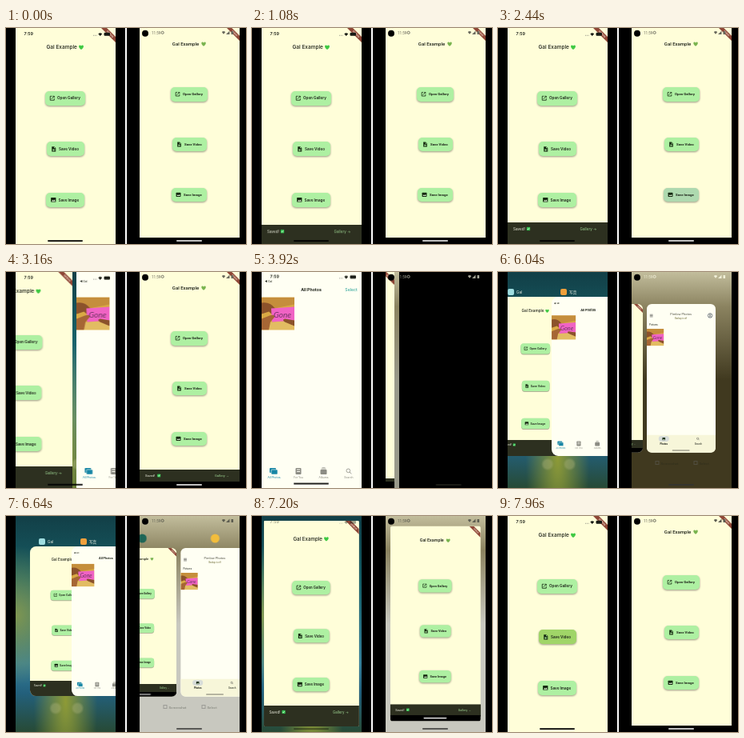
Animation of 300 by 270 pixels, one loop 8 s. Source, as an HTML page:

```html
<!DOCTYPE html>
<html lang="en">
<head>
<meta charset="utf-8">
<title>Gal Example</title>
<style>
html, body { margin: 0; width: 100%; height: 100%; overflow: hidden; background: #000; }
.divider { position: absolute; left: 149px; top: 0; width: 2px; height: 270px; background: #fff; }
.phone { position: absolute; top: 0; width: 125px; height: 270px; overflow: hidden; }
.ios { left: 12px; font-family: Inter, sans-serif; }
.android { left: 167px; font-family: Roboto, sans-serif; }
.wall, .slot, .card, .phone svg.full { position: absolute; left: 0; top: 0; width: 125px; height: 270px; }
.card { overflow: hidden; transform-origin: 0 0; }
svg { display: block; overflow: visible; }
.gal { background: #fffed9; }
.photos { background: #fffff3; }
text { fill: #1c2018; }
.mid { text-anchor: middle; }
.ios .title { font-size: 6.5px; font-weight: 500; }
.android .title { font-size: 6px; font-weight: 500; }
.btn text { font-weight: 600; }
.ios .btn text { font-size: 4.6px; }
.android .btn text { font-size: 4.35px; }
.btn rect { fill: #aef0a2; filter: drop-shadow(0 1px 1px #0006); }
.snack rect { fill: #2d3020; }
.snack text { font-size: 4.6px; fill: #eef0e0; }
.snack .action { fill: #9fd693; }
.android .snack text { font-size: 4.2px; }
.tab { font-size: 3.4px; text-anchor: middle; fill: #8c8c84; }
.tag { position: absolute; }

/* Every part shares one eight second clock */
.wall, .slot, .card, .status, .tag, .snack, .splash, .press { animation: 8s linear infinite; }

.ios .wall {
  background:
    radial-gradient(circle at 40% 89%, #a9b0786b 0 5px, transparent 8px),
    radial-gradient(circle at 62% 89%, #a9b0786b 0 5px, transparent 8px),
    radial-gradient(ellipse at 50% 86%, #8e9a36 0, transparent 45%),
    radial-gradient(ellipse at 0 46%, #7f9650 0, transparent 42%),
    linear-gradient(#123f47, #176068 30%, #37809a 68%, #23607c 82%, #274a35);
}
.android .wall { background: #99998a; animation-name: dim; }
@keyframes dim {
  0%, 67% { background-color: #99998a; }
  75.5%, 78% { background-color: #40391f; }
  83%, 100% { background-color: #c8c8bf; }
}
.glow { position: absolute; inset: 0; background: linear-gradient(#c2bd9c, #8b8360 16%, #5d563600 50%); }

.ios .card { animation-name: ios-scale; }
@keyframes ios-scale {
  0%, 67.5% { transform: scale(1); border-radius: 0; animation-timing-function: ease-out; }
  75.5% { transform: scale(.737); border-radius: 11px; animation-timing-function: ease-out; }
  83%, 87% { transform: scale(.693); border-radius: 11px; animation-timing-function: ease-out; }
  91.5%, 100% { transform: scale(1); border-radius: 0; }
}
.ios .home { animation-name: ios-gal; }
@keyframes ios-gal {
  0%, 38% { transform: none; animation-timing-function: ease-out; }
  43.5%, 67.5% { transform: translate(-130px, 0); animation-timing-function: ease-out; }
  75.5% { transform: translate(-11px, 31px); animation-timing-function: ease-out; }
  83%, 87% { transform: translate(18px, 38px); animation-timing-function: ease-out; }
  91.5%, 100% { transform: none; }
}
.ios .library { animation-name: ios-photos; }
@keyframes ios-photos {
  0%, 38% { transform: translate(130px, 0); animation-timing-function: ease-out; }
  43.5%, 67.5% { transform: none; animation-timing-function: ease-out; }
  75.5% { transform: translate(55px, 31px); animation-timing-function: ease-out; }
  83%, 87% { transform: translate(70px, 38px); animation-timing-function: ease-out; }
  91.5%, 100% { transform: translate(140px, 0); }
}
.ios .tag { left: 11px; top: -10px; animation-name: ios-tag; }
@keyframes ios-tag { 0%, 71% { opacity: 0; } 75%, 87% { opacity: 1; } 89%, 100% { opacity: 0; } }
.ios .status { animation-name: ios-status; }
@keyframes ios-status {
  0%, 39% { opacity: 1; transform: none; }
  42%, 67.5% { opacity: 1; transform: translateY(-1.5px); }
  70%, 89% { opacity: 0; transform: none; }
  91.5%, 100% { opacity: 1; transform: none; }
}
.ios .snack { animation-name: ios-snack; }
@keyframes ios-snack {
  0%, 11% { transform: translateY(28px); animation-timing-function: ease-out; }
  14.5%, 92% { transform: none; animation-timing-function: ease-in; }
  95%, 100% { transform: translateY(28px); }
}

.android .card { animation-name: android-scale; }
@keyframes android-scale {
  0%, 67.5% { transform: scale(1); border-radius: 0; animation-timing-function: ease-out; }
  74.5%, 88% { transform: scale(.688); border-radius: 9px; animation-timing-function: ease-out; }
  92%, 100% { transform: scale(1); border-radius: 0; }
}
.android .home { animation-name: android-gal; }
@keyframes android-gal {
  0%, 46.5% { transform: none; }
  49% { transform: translate(-114px, 0); }
  49.75%, 67.5% { transform: translate(-130px, 0); animation-timing-function: ease-out; }
  74.5%, 79% { transform: translate(-72px, 40px); }
  83% { transform: translate(-40px, 40px); animation-timing-function: ease-out; }
  86.5%, 88% { transform: translate(19px, 40px); animation-timing-function: ease-out; }
  92%, 100% { transform: none; }
}
.android .library { animation-name: android-photos; }
@keyframes android-photos {
  0%, 46.5% { transform: translate(130px, 0); }
  49% { transform: translate(17px, 0); }
  49.75%, 67.5% { transform: none; animation-timing-function: ease-out; }
  74.5%, 79% { transform: translate(19px, 40px); }
  83% { transform: translate(51px, 40px); animation-timing-function: ease-out; }
  86.5%, 88% { transform: translate(110px, 40px); }
  92%, 100% { transform: translate(150px, 40px); }
}
.android .tag { left: 37px; top: -18px; animation-name: android-tag; }
@keyframes android-tag { 0%, 76% { opacity: 0; } 80%, 88% { opacity: 1; } 90%, 100% { opacity: 0; } }
.android .status { animation-name: android-status; }
@keyframes android-status {
  0%, 47% { color: #68685c; }
  48.5%, 52% { color: #a5a596; }
  54%, 69% { color: #68685c; }
  74%, 78% { color: #f0efd8; }
  82%, 100% { color: #5c5c50; }
}
.android .snack { animation-name: android-snack; }
@keyframes android-snack {
  0%, 32.5% { transform: translateY(16px); animation-timing-function: ease-out; }
  35.5%, 46.5% { transform: none; }
  49% { transform: translateY(11px); }
  50% { transform: translateY(15px); }
  54%, 93% { transform: none; animation-timing-function: ease-in; }
  96%, 100% { transform: translateY(16px); }
}
.splash { animation-name: splash; }
@keyframes splash { 0%, 52% { opacity: 1; } 54.5%, 100% { opacity: 0; } }

.press.save-ios { animation-name: press-ios; }
@keyframes press-ios { 0%, 5.5% { fill: #aef0a2; } 7%, 9.5% { fill: #a0d86a; } 12%, 100% { fill: #aef0a2; } }
.press.video-ios { animation-name: press-video; }
@keyframes press-video { 0%, 97.5% { fill: #aef0a2; } 99.3%, 100% { fill: #a0d568; } }
.press.save-android { animation-name: press-android; }
@keyframes press-android { 0%, 29% { fill: #aef0a2; } 30.4%, 32% { fill: #aed9af; } 34%, 100% { fill: #aef0a2; } }
</style>
</head>
<body>
<svg width="0" height="0" style="position:absolute">
  <symbol id="open" viewBox="0 0 24 24"><path d="M11 4H4v16h16v-7M14 4h6v6M20 4 9 15" fill="none" stroke="#14280f" stroke-width="2.6"/></symbol>
  <symbol id="file" viewBox="0 0 24 24"><path d="M4 2h10l6 6v14H4z" fill="#14280f"/><path d="M13 3v6h6M8 13h5v6H8zM13 16l4-3v6z" fill="#aef0a2"/></symbol>
  <symbol id="image" viewBox="0 0 24 24"><rect x="2" y="3" width="20" height="18" rx="2" fill="#14280f"/><path d="m5 18 4-6 3 4 4-5 4 7z" fill="#dff5d5"/></symbol>
  <symbol id="heart" viewBox="0 0 24 24"><path d="M12 22C-6 10 4-3 12 6c8-9 18 4 0 16z"/></symbol>
  <symbol id="check" viewBox="0 0 24 24"><rect x="1" y="1" width="22" height="22" rx="4" fill="#36c552"/><path d="m6 12 4 5 8-10" fill="none" stroke="#fff" stroke-width="3"/></symbol>
  <symbol id="search" viewBox="0 0 24 24"><path d="M15 15l7 7M17 10a7 7 0 1 1-14 0 7 7 0 0 1 14 0z" fill="none" stroke="currentColor" stroke-width="2.4"/></symbol>
  <symbol id="wifi" viewBox="0 0 24 24"><path d="M0 8Q12-2 24 8L12 22z" fill="currentColor"/></symbol>
  <symbol id="ribbon" viewBox="0 0 18 18">
    <path d="M0 0h7l11 11v7z" fill="#8e4636"/>
    <text class="mid" transform="translate(10.3 8.4) rotate(45)" font-size="3.2" font-weight="700" style="fill:#f4dccb">DEBUG</text>
  </symbol>
  <symbol id="photo" viewBox="0 0 41 41">
    <rect width="41" height="41" fill="#d9a944"/>
    <path d="M0 0h41v9L0 17z" fill="#c58e3c"/>
    <path d="M0 32 41 29v12H0z" fill="#e2bc62"/>
    <path d="M0 7Q10 5 17 14l5 8-7 1-6-5-9 3z" fill="#8b522b"/>
    <path d="M12 14 41 12v17l-28 2z" fill="#f063c4"/>
    <path d="M0 27 10 23q7-2 6 2l-5 6-2 10H0z" fill="#a66635"/>
    <path d="M41 29 29 27q-4 1 0 4l12 5z" fill="#8b522b"/>
    <text x="15" y="25" font-size="10" font-style="italic" font-family="Lato, sans-serif" style="fill:#713365">Gone</text>
  </symbol>
</svg>

<div class="phone ios">
  <div class="wall"></div>
  <div class="slot home">
    <div class="tag"><svg width="40" height="10"><rect width="8" height="8" rx="2" fill="#9fdde0"/><text x="11" y="6" font-size="4.6" style="fill:#e7eee2">Gal</text></svg></div>
    <div class="card gal"><svg class="full" viewBox="0 0 125 270">
      <text class="title" x="38.5" y="26">Gal Example</text>
      <use href="#heart" x="78.5" y="20.5" width="7" height="7" fill="#3fc943"/>
      <use href="#ribbon" x="107" y="0" width="18" height="18"/>
      <g class="btn"><rect x="37" y="79" width="50" height="18" rx="5"/><use href="#open" x="42" y="84" width="7.5" height="7.5"/><text x="52" y="89.4">Open Gallery</text></g>
      <g class="btn"><rect class="press video-ios" x="39" y="142" width="47" height="18" rx="5"/><use href="#file" x="44" y="147.5" width="7.5" height="7.5"/><text x="54" y="152.9">Save Video</text></g>
      <g class="btn"><rect class="press save-ios" x="38" y="206" width="48" height="18" rx="5"/><use href="#image" x="43.5" y="211" width="7.5" height="7.5"/><text x="53.5" y="216.5">Save Image</text></g>
      <g class="snack"><rect y="243" width="125" height="28"/><text x="7" y="252.6">Saved!</text><use href="#check" x="23.5" y="248.5" width="5" height="5"/><text class="action" x="90.5" y="252.6">Gallery →</text></g>
    </svg></div>
  </div>
  <div class="slot library">
    <div class="tag"><svg width="40" height="10"><rect width="8" height="8" rx="2" fill="#f0a03c"/><text x="11" y="6" font-size="4.6" font-family="Noto Sans CJK JP, Noto Sans CJK, sans-serif" style="fill:#e7eee2">写真</text></svg></div>
    <div class="card photos"><svg class="full" viewBox="0 0 125 270">
      <text x="4" y="12.6" font-size="3.4">◀ Gal</text>
      <text class="mid" x="62" y="23.8" font-size="5.2" font-weight="700">All Photos</text>
      <text class="mid" x="112" y="23.8" font-size="5.2" style="fill:#179b91">Select</text>
      <use href="#photo" x="0" y="31.5" width="41" height="41"/>
      <g fill="#1685a5"><rect x="10" y="245" width="8" height="6" rx="1"/><rect x="12" y="247" width="8" height="6" rx="1" stroke="#fffff3" stroke-width=".6"/></g>
      <g fill="#8c8c84"><rect x="42.5" y="245" width="7" height="8" rx="1"/><path d="M44 247h4M44 249.5h4" stroke="#fffff3"/><rect x="73.5" y="247" width="8" height="6" rx="1"/><path d="M74.5 246h6M75.5 244.7h4" stroke="#8c8c84" stroke-width=".7"/></g>
      <use href="#search" x="105" y="245" width="8" height="8" color="#8c8c84"/>
      <text class="tab" x="15.5" y="257.5" style="fill:#1685a5">All Photos</text><text class="tab" x="46" y="257.5">For You</text><text class="tab" x="77.5" y="257.5">Albums</text><text class="tab" x="109" y="257.5">Search</text>
    </svg></div>
  </div>
  <svg class="full status" viewBox="0 0 125 270">
    <text x="10.5" y="9.4" font-size="5.4" font-weight="600">7:59</text>
    <path d="M97 9.3h4.5" stroke="#666" stroke-width=".8" stroke-dasharray=".8 1"/>
    <use href="#wifi" x="103" y="5.5" width="5.5" height="5" color="#171a14"/>
    <rect x="110.5" y="5.7" width="7.5" height="4" rx="1.2" fill="#171a14"/>
    <rect x="40" y="265.3" width="44" height="1.6" rx=".8"/>
  </svg>
</div>

<div class="divider"></div>

<div class="phone android">
  <div class="wall"><div class="glow"></div>
    <svg class="full" viewBox="0 0 125 270">
      <g opacity=".45"><rect x="30" y="236.5" width="4" height="4" fill="none" stroke="#666"/><text x="36.5" y="240.5" font-size="4.4">Screenshot</text><rect x="78" y="236.5" width="4" height="4" fill="none" stroke="#666"/><text x="84.5" y="240.5" font-size="4.4">Select</text></g>
      <rect x="46" y="265.3" width="32" height="1.4" rx=".7" fill="#333"/>
    </svg></div>
  <div class="slot home">
    <div class="tag"><svg width="12" height="12"><circle cx="6" cy="6" r="5.5" fill="#1f6657"/></svg></div>
    <div class="card gal"><svg class="full" viewBox="0 0 125 270">
      <text class="title" x="40.8" y="22">Gal Example</text>
      <use href="#heart" x="76.8" y="16.8" width="6.5" height="6.5" fill="#79b44f"/>
      <use href="#ribbon" x="109" y="0" width="16" height="16"/>
      <g class="btn"><rect x="39" y="74" width="46" height="18" rx="5"/><use href="#open" x="44" y="79.2" width="7" height="7"/><text x="54" y="84.4">Open Gallery</text></g>
      <g class="btn"><rect x="41" y="137" width="43" height="17" rx="5"/><use href="#file" x="46" y="142" width="7" height="7"/><text x="56" y="147.1">Save Video</text></g>
      <g class="btn"><rect class="press save-android" x="40" y="200" width="44" height="17" rx="5"/><use href="#image" x="45" y="204.8" width="7" height="7"/><text x="55" y="210">Save Image</text></g>
      <g class="snack"><rect y="247" width="125" height="16"/><text x="7" y="256">Saved!</text><use href="#check" x="22" y="252.2" width="4.5" height="4.5"/><text class="action" x="94" y="256">Gallery →</text></g>
      <rect y="262" width="125" height="8"/>
      <rect x="46" y="265.2" width="32" height="1.5" rx=".7" fill="#fff"/>
    </svg></div>
  </div>
  <div class="slot library">
    <div class="tag"><svg width="12" height="12"><circle cx="6" cy="6" r="5.5" fill="#f2bd3c"/></svg></div>
    <div class="card photos"><svg class="full" viewBox="0 0 125 270">
      <path d="M5.5 19.2h5.5M5.5 21.2h5.5M5.5 23.2h5.5" stroke="#333" stroke-width=".8"/>
      <text class="mid" x="62" y="21" font-size="5.8" style="fill:#55564b">Pimlow Photos</text>
      <text class="mid" x="62" y="27.3" font-size="3.8" style="fill:#6c6a35">Backup is off</text>
      <g fill="none" stroke="#384352" stroke-width=".9"><circle cx="115" cy="21" r="4"/><circle cx="115" cy="19.8" r="1.3"/><path d="M112.3 23.8q2.7-2.5 5.4 0"/></g>
      <text x="4.5" y="39.8" font-size="4.3">Pictures</text>
      <use href="#photo" x="0" y="45" width="31" height="31"/>
      <rect y="238" width="125" height="32" fill="#f7f6d9"/>
      <rect x="21.5" y="240" width="19" height="10" rx="5" fill="#d8ddd9"/>
      <use href="#image" x="27.7" y="241.8" width="6.5" height="6.5"/>
      <use href="#search" x="90" y="242" width="6" height="6" color="#333"/>
      <text class="mid" x="31" y="256.5" font-size="4.4" font-weight="700">Photos</text>
      <text class="mid" x="93.5" y="256.5" font-size="4.4">Search</text>
      <rect x="46" y="265.2" width="32" height="1.5" rx=".7" fill="#77776a"/>
      <g class="splash"><rect width="125" height="270"/><rect x="46" y="265.2" width="32" height="1.5" rx=".7" fill="#24241d"/></g>
    </svg></div>
  </div>
  <svg class="full status" viewBox="0 0 125 270">
    <text x="15" y="7.6" font-size="4.5" style="fill:currentColor">11:59</text>
    <circle cx="28.6" cy="5.8" r="1.6" fill="none" stroke="currentColor" stroke-width=".9"/>
    <use href="#wifi" x="102.5" y="3.5" width="5" height="4.5"/>
    <path d="M108 8h4.5V3.5zM114.5 8V4h2.6v4z" fill="currentColor"/>
    <circle cx="7" cy="6.7" r="4"/>
  </svg>
</div>
</body>
</html>
```
